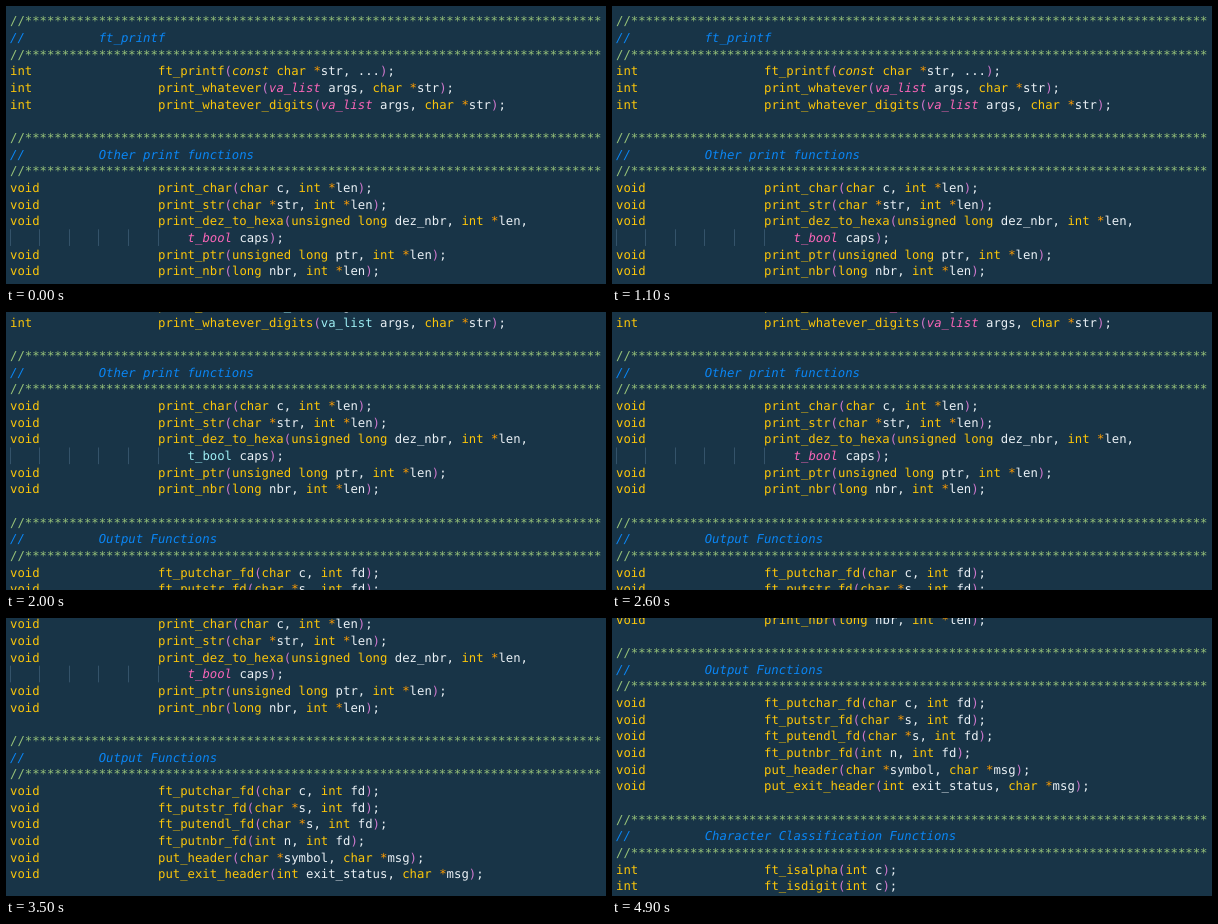
An HTML page that plays this animation: 600 px wide and 278 px high, repeating every 5000 ms.

```html
<!DOCTYPE html>
<html lang="en">
<head>
<meta charset="utf-8">
<title>Header scroll</title>
<style>
  html, body { margin: 0; width: 100%; height: 100%; overflow: hidden; background: #183447; }
  svg { display: block; width: 600px; height: 278px; }
  text {
    font: 12.29px "DejaVu Sans Mono", "Liberation Mono", monospace;
    text-rendering: geometricPrecision;
    white-space: pre;
    fill: #eaf1f6;
  }
  .rule { fill: #98c379; }
  .paren { fill: #cf78cd; }
  .guide { stroke: #34536a; stroke-width: 1; }
  .full .note, .basic .note { fill: #0a86f5; font-style: italic; }
  .full .key, .full .func, .full .const,
  .basic .key, .basic .func, .basic .const { fill: #fcc60a; }
  .full .const { font-style: italic; }
  .full .star, .basic .star { fill: #ff9d00; }
  .basic .type { fill: #9eeff5; }
  .full .type { fill: #fb66b8; font-style: italic; }
</style>
</head>
<body>
<svg viewBox="0 0 600 278"><g id="code"></g></svg>
<script>
const LEFT = 4, COL = 7.4, ROW = 16.667, BASE = 19.2, STEP = 43.9, LOOP = 5000;
const RULE = "//" + "*".repeat(78);

const section = (title, lines) => [RULE, "//          " + title, RULE, ...lines, ""];
const proto = (type, rest) => type.padEnd(20) + rest;

const lines = [
  ...section("ft_printf", [
    proto("int", "ft_printf(const char *str, ...);"),
    proto("int", "print_whatever(va_list args, char *str);"),
    proto("int", "print_whatever_digits(va_list args, char *str);")
  ]),
  ...section("Other print functions", [
    proto("void", "print_char(char c, int *len);"),
    proto("void", "print_str(char *str, int *len);"),
    proto("void", "print_dez_to_hexa(unsigned long dez_nbr, int *len,"),
    " ".repeat(24) + "t_bool caps);",
    proto("void", "print_ptr(unsigned long ptr, int *len);"),
    proto("void", "print_nbr(long nbr, int *len);")
  ]),
  ...section("Output Functions", [
    proto("void", "ft_putchar_fd(char c, int fd);"),
    proto("void", "ft_putstr_fd(char *s, int fd);"),
    proto("void", "ft_putendl_fd(char *s, int fd);"),
    proto("void", "ft_putnbr_fd(int n, int fd);"),
    proto("void", "put_header(char *symbol, char *msg);"),
    proto("void", "put_exit_header(int exit_status, char *msg);")
  ]),
  ...section("Character Classification Functions", [
    proto("int", "ft_isalpha(int c);"),
    proto("int", "ft_isdigit(int c);")
  ])
];

const kinds = [
  ["key", /^(int|void|char|unsigned|long)$/],
  ["const", /^const$/],
  ["type", /^(va_list|t_bool)$/],
  ["paren", /^[()]$/],
  ["star", /^\*$/]
];

function tokens(line) {
  if (line === RULE) return [["rule", line]];
  if (line.startsWith("//")) return [["note", line]];
  const words = line.match(/\w+|\s+|[^\w\s]/g) || [];
  return words.map((word, i) => {
    const kind = kinds.find(([, test]) => test.test(word));
    return [kind ? kind[0] : words[i + 1] === "(" ? "func" : "name", word];
  });
}

const code = document.getElementById("code");

function add(parent, tag, attrs, content = "") {
  const node = document.createElementNS("http://www.w3.org/2000/svg", tag);
  for (const name in attrs) node.setAttribute(name, attrs[name]);
  node.textContent = content;
  return parent.appendChild(node);
}

lines.forEach((line, row) => {
  const y = BASE + row * ROW;
  const text = add(code, "text", { y });
  let col = 0;
  for (const [kind, word] of tokens(line)) {
    if (word.trim()) add(text, "tspan", { x: LEFT + col * COL, class: kind }, word);
    col += word.length;
  }
  if (line.startsWith(" ")) {
    for (let c = 0; c < 24; c += 4) {
      const x = Math.floor(LEFT + c * COL) + 0.5;
      add(code, "line", { class: "guide", x1: x, x2: x, y1: y - 12.6, y2: y + 4.1 });
    }
  }
});

// start time, wheel notches scrolled, highlighting
const steps = [
  [0, 0, "full"],
  [1600, 1, "plain"],
  [1700, 1, "basic"],
  [2000, 2, "basic"],
  [2500, 2, "full"],
  [2800, 3, "full"],
  [3500, 4, "full"],
  [4200, 5, "full"],
  [4900, 6, "full"]
];

const start = performance.now();
let shown;

function draw(now) {
  const t = Math.max(0, now - start) % LOOP;
  const step = steps.filter(s => s[0] <= t).pop();
  if (step !== shown) {
    shown = step;
    code.setAttribute("transform", `translate(0 ${-step[1] * STEP})`);
    code.setAttribute("class", step[2]);
  }
  requestAnimationFrame(draw);
}
draw(start);
</script>
</body>
</html>
```
